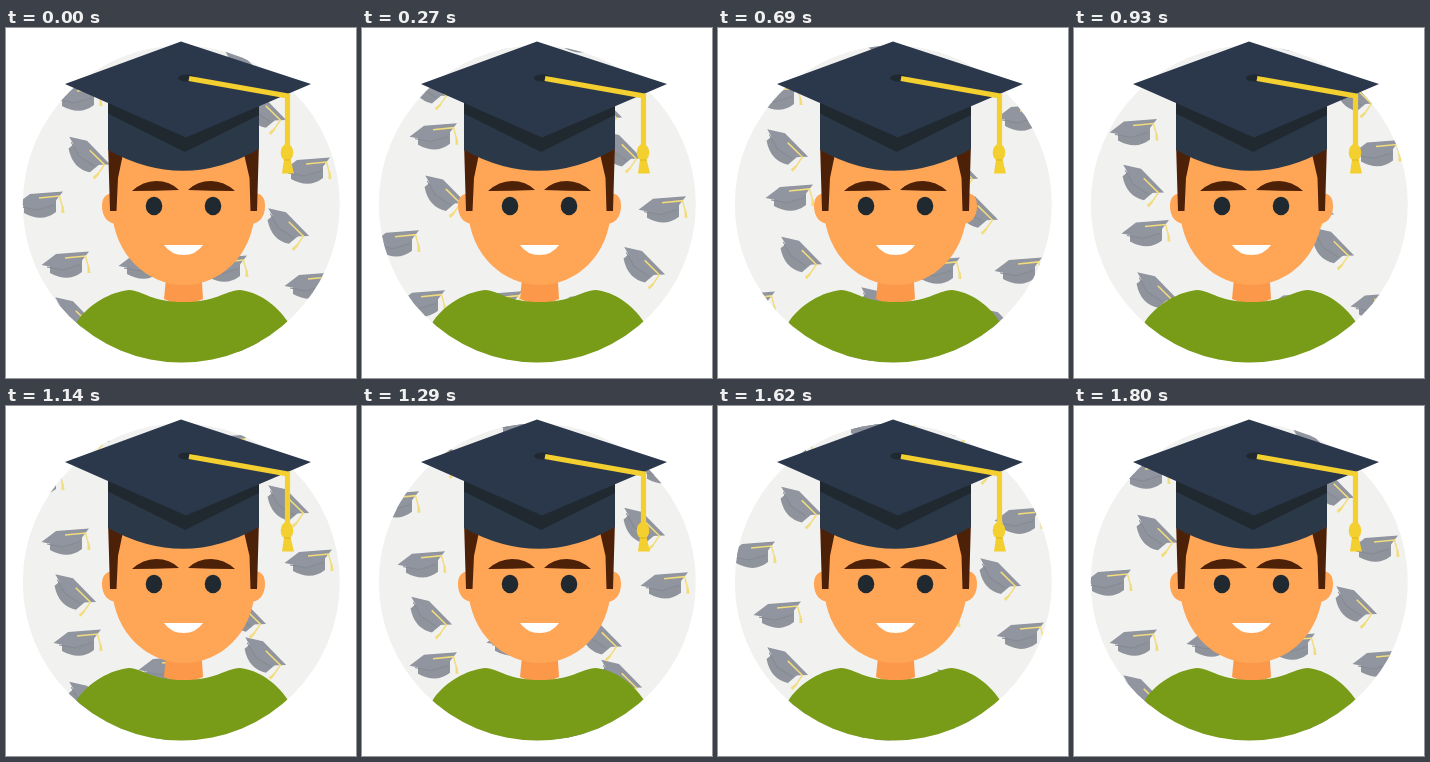
Write an HTML page with a canvas that moves like this. It is 350x350 px and loops after 1830 ms.

```html
<!DOCTYPE html>
<html lang="en">
<head>
<meta charset="utf-8">
<title>Graduate</title>
<style>
html, body { margin: 0; width: 100%; height: 100%; overflow: hidden; background: #fff; }
canvas { display: block; width: 350px; height: 350px; }
</style>
</head>
<body>
<canvas id="stage"></canvas>
<script>
const canvas = document.getElementById('stage');
const ctx = canvas.getContext('2d');
const ratio = window.devicePixelRatio || 1;
canvas.width = canvas.height = Math.round(350 * ratio);

const LOOP = 1830, STEP = 30, FALL = 1800, TILE = 268;
const NAVY = '#2b384c', CROWN = '#2b3848', DARK = '#1f292f', GOLD = '#f3cf30', HAIR = '#4d2008';
const SKIN = '#fea556', NECK = '#fc9849', SHIRT = '#789c18';

// x, y at the start of the loop, tilted or not
const caps = [
  [68, 19, 1], [72, 70, 0], [82, 126.5, 1], [34, 177, 0], [60, 237, 0],
  [301, 143, 0], [281, 198, 1], [303, 258, 0], [258, 82, 1], [238, 41, 1],
  [218, 241, 0], [219, 143, 0], [137, 238, 0], [157, 97, 0], [149, 47, 0],
  [174, 46, 0], [162, 177, 1]
];

const shape = d => new Path2D(d);
const fill = (path, color) => { ctx.fillStyle = color; ctx.fill(path); };

function stroke(path, color, width) {
  ctx.strokeStyle = color;
  ctx.lineWidth = width;
  ctx.stroke(path);
}

function oval(x, y, rx, ry, color) {
  ctx.beginPath();
  ctx.ellipse(x, y, rx, ry, 0, 0, Math.PI * 2);
  ctx.fillStyle = color;
  ctx.fill();
}

const small = {
  body: shape('M-16 -2L-16 8Q2 18 16 7L16 -6Z'),
  board: shape('M-24.500 0L-10 -11L23 -13.500L14 -2L-3 4Z'),
  edge: shape('M-19 2L-3 5L14 0'),
  cord: shape('M-1 -7L19.500 -9L22.500 2'),
  tuft: shape('M21.500 1L23.500 1L24.500 8L21.500 8Z')
};

const art = {
  ears: shape('M112 165C101 164 96 169 96 178C96 189 102 196 112 196ZM244 165C255 164 259 169 259 178C259 189 253 196 244 196Z'),
  face: shape('M106 115L106 182C108 228 142 257 178 257C214 257 247 228 249 182L249 115Z'),
  neck: shape('M161 240L158 271Q178 280 197 271L195 240Z'),
  shirt: shape('M60 312L72 292C84 276 104 264 123 262C138 263 145 274 178 274C210 274 218 263 234 262C252 264 270 276 282 294L290 345L60 345Z'),
  hair: shape('M102 115L104 183L110.500 183L112 150L117 126L117 115ZM253 115L251 183L244.500 183L243.500 150L238 126L238 115Z'),
  brows: shape('M126 163Q137 153 150 153Q164 153 173 162Q149 163 126 163ZM229 163Q218 153 205 153Q191 153 182 162Q206 163 229 163Z'),
  smile: shape('M158 217L197 217Q190 227 177.500 227Q165 227 158 217Z'),
  crown: shape('M102 70L102 122Q178 164 253 121L253 70Z'),
  shade: shape('M102 74L102 85.500L179 124L253 87L253 76L180 100Z'),
  board: shape('M175 13.500L305 56L180 109.500L59 56Z'),
  cord: shape('M183 50.500L281.500 68L281.500 118'),
  tuft: shape('M278 131L284.500 131L288 145.500L276 145.500Z'),
  fold: shape('M278 132L284.500 132')
};

function smallCap(x, y, tilted) {
  ctx.save();
  ctx.translate(x, y);
  if (tilted) {
    ctx.translate(-3, 1);
    ctx.rotate(50 * Math.PI / 180);
  }
  fill(small.body, '#8e939c');
  fill(small.board, '#90959f');
  stroke(small.edge, '#858a93', 1);
  stroke(small.cord, '#f2dc7c', 1.5);
  fill(small.tuft, '#f2dc7c');
  ctx.restore();
}

function fallingCaps(t) {
  const u = t / FALL;
  const drop = TILE * u - 12 * u * (1 - u);
  for (const [x, y, tilted] of caps) {
    const top = (y + drop + 40) % TILE - 40;
    smallCap(x, top, tilted);
    smallCap(x, top + TILE, tilted);
  }
}

function graduate() {
  fill(art.neck, NECK);
  fill(art.shirt, SHIRT);
  fill(art.ears, SKIN);
  fill(art.face, SKIN);
  fill(art.hair, HAIR);
  fill(art.brows, HAIR);
  oval(148, 178, 8.3, 9.2, DARK);
  oval(207, 178, 8.3, 9.2, DARK);
  fill(art.smile, '#fff');
}

function bigCap() {
  fill(art.crown, CROWN);
  fill(art.shade, DARK);
  fill(art.board, NAVY);
  oval(181, 50, 9, 3.5, DARK);
  stroke(art.cord, GOLD, 5.2);
  fill(art.tuft, GOLD);
  oval(281, 124.5, 6.3, 8.5, GOLD);
  stroke(art.fold, '#dcb325', 1);
}

function draw(t) {
  ctx.setTransform(ratio, 0, 0, ratio, 0, 0);
  ctx.fillStyle = '#fff';
  ctx.fillRect(0, 0, 350, 350);
  ctx.save();
  ctx.beginPath();
  ctx.arc(175.3, 176, 158.5, 0, Math.PI * 2);
  ctx.clip();
  ctx.fillStyle = '#f1f1f0';
  ctx.fillRect(0, 0, 350, 350);
  fallingCaps(t);
  graduate();
  ctx.restore();
  bigCap();
}

const start = performance.now();
function tick() {
  const t = (performance.now() - start) % LOOP;
  draw(Math.floor(t / STEP) * STEP);
  requestAnimationFrame(tick);
}
tick();
</script>
</body>
</html>
```
